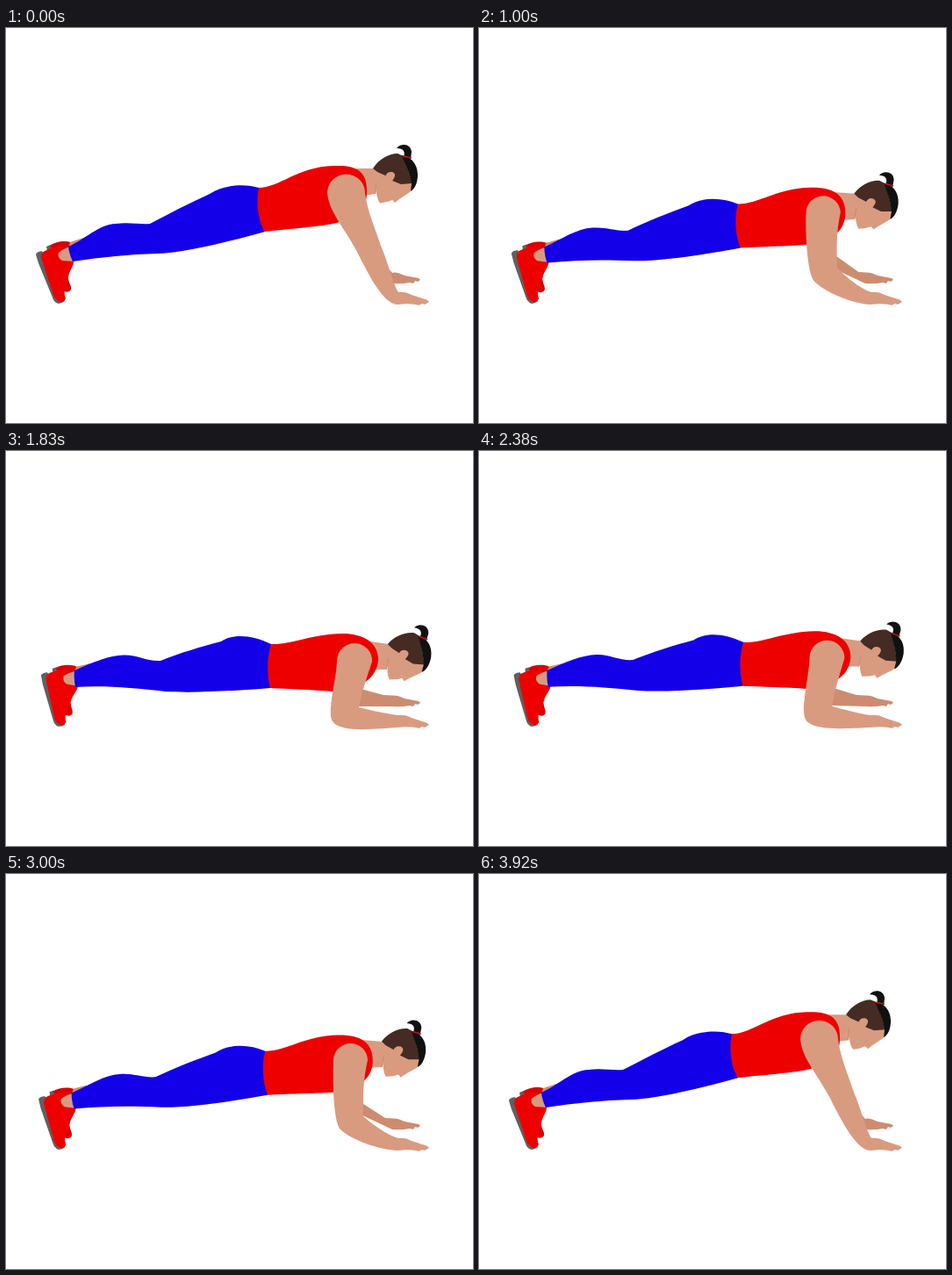
These frames come from a looping animation (532 px wide and 450 px high, 3960 ms). An HTML page:

```html
<!DOCTYPE html>
<html lang="en">
<head>
<meta charset="utf-8">
<title>Push-up</title>
<style>
  html, body { margin: 0; width: 100%; height: 100%; overflow: hidden; background: #fff; }
  svg { display: block; width: 100%; height: 100%; }
  .skin { fill: #d99b7f; }
  .shade { fill: #cd8c70; }
  .red { fill: #ee0000; }
  .dark-red { fill: #d90000; }
  .blue { fill: #1400e8; }
  .sole { fill: #606060; }
  .hair { fill: #452b23; }
  .black { fill: #111; }
</style>
</head>
<body>
<svg viewBox="0 0 532 450">
  <path id="farArm" class="shade"/>

  <g id="feet">
    <path class="shade" d="M70 245L88 239L84 250L68 256Z"/>
    <path class="sole" d="M46 249L51 247L53 256L47 254Z"/>
    <path class="dark-red" d="M50 248C56 243 68 242 73 244L71 251L58 262Z"/>
    <path class="dark-red" d="M64 284L71 286C72 292 75 294 74 298Q72 302 66 300Z"/>
    <path class="sole" d="M34 258Q35 255 41 254L48 270L67 311Q62 315 58 313.500Q54 311 53 307L37 268Z"/>
    <path class="red" d="M41 256C48 251 56 250 64 248L77 266C77 272 72 276 71 284C70 294 64 298 68 308Q66 313 62 312Q56 310 54 304L40 262Z"/>
    <path class="skin" d="M60 256Q64 252 73 249L78 266L64 265Q58 261 60 256Z"/>
  </g>

  <g id="head">
    <path class="skin" d="M395 160L419 160L424 168L421 189L400 192Z"/>
    <path class="skin" d="M419 160L440 150L462 176Q463 184 460 187L448 195L443 199L440 196Q434 199 426 199.500Q422 195 421 180Z"/>
    <path d="M421.500 176L420.500 189" stroke="#c98a6e" fill="none"/>
    <path class="hair" d="M418 160C424 150 436 143 446 143L453 146L463 177L450 178L440 174L432 168L423 164Z"/>
    <path class="skin" d="M432 169Q434 163 440 164Q445 166 442 171L439 176Z"/>
    <path class="black" d="M451 145.500C464 147 469 158 469 167C469 177 465 184 461 186L462 177C460 165 455 155 451 145.500Z"/>
    <path class="black" d="M445 137C449 131 461 131 462 141L461 149L453 147C455 141 453 137 445 137Z"/>
    <path d="M452 146L462 148" stroke="#d01010" stroke-width="1.500"/>
  </g>

  <path id="torso" class="red"/>
  <path id="legs" class="blue"/>
  <path id="nearArm" class="skin"/>
</svg>
<script>
const LOOP = 3960, FRAMES = 95, FPMS = 0.024;

// Key depths: 0 is the raised pose, 1 the lowest one.
const bodyDepths = [0, 0.978];
const armDepths = [0, 0.199, 0.509, 0.731, 0.978];

// The waist side reaches under the legs so that no seam shows.
const torso = [
  'M287 182C312 182 332 158 373 157C400 156 412 163 411 188C411 205 400 215 380 221C365 226 330 228 295 232C280 222 276 200 287 182Z',
  'M302 220C325 221 345 209 383 208C408 208 425 219 424 239C422 256 410 270 372 274C350 272 320 271 301 270C289 255 289 235 302 220Z'
];

const legs = [
  'M71 249C90 241 105 224 125 223C140 221 152 224 164 223C185 212 210 199 232 189C250 177 275 178 288 182C284 200 288 222 295 232C255 243 205 256 172 257C140 258 110 261 76 266Q72 258 71 249Z',
  'M78 250C100 240 118 233 134 232.5C150 232 160 240 176 239C195 231 225 222 245 217C258 208 280 209 302 220C297 235 297 255 301 270C265 273 215 276 182 274C145 270 115 267 79 269Q77 260 78 250Z'
];

const nearHand = 'C455 314 460 314 467 315L470 316L474 314L477 315L482 312Q480 309 474 308L462 304Q455 300 447 301Z';
const nearArm = [
  'C441 292 435 266 427 248C421 229 412 210 409 188A9 9 0 0 0 366 188C368 212 390 232 404 263C413 280 430 315 446 315',
  'C441 300 424 272 416 251C413 238 409 215 410 198A9 9 0 0 0 369 198C369 218 379 253 393 271C402 284 431 314 446 315',
  'C436 298 418 286 407 276C407 258 406 238 412 212A9 9 0 0 0 373 213C372 237 373 280 380 290C392 303 425 314 446 315',
  'C436 299 414 291 403 286C404 268 409 246 414 224A9 9 0 0 0 375 224C374 248 366 290 374 301C382 313 425 314 446 315',
  'C436 300 414 295 402 292C405 275 411 258 417 240A9 9 0 0 0 377 238C377 258 365 298 372 308C381 322 425 316 446 315'
].map(d => 'M447 301' + d + nearHand);

const farHand = 'Q442 278 448 279.5L454 282L470 285L472 287L469 289L466 288L464 291L460 290Q450 292 440 291';
const farArm = [
  ['M425 262L440 279', 'L432 285Z'],
  ['M414 247L435 278', 'L425 285Z'],
  ['M404 260L432 278', 'L404 274Z'],
  ['M402 266L430 278', 'L400 285Z'],
  ['M404 271L430 278', 'L398 291Z']
].map(([top, bottom]) => top + farHand + bottom);

const NUMBER = /[\d.]+/g;
const byId = id => document.getElementById(id);

// Arc flags must stay bare digits, so trailing zeros are dropped.
function blend(from, to, mix) {
  const ends = to.match(NUMBER);
  let i = 0;
  return from.replace(NUMBER, n => +(+n + (ends[i++] - n) * mix).toFixed(2));
}

function morph(id, poses, depths, depth) {
  let i = 0;
  while (i < depths.length - 2 && depth > depths[i + 1]) i++;
  const mix = (depth - depths[i]) / (depths[i + 1] - depths[i]);
  byId(id).setAttribute('d', blend(poses[i], poses[i + 1], mix));
}

function turn(id, angle, x, y) {
  byId(id).setAttribute('transform', `rotate(${angle} ${x} ${y})`);
}

function draw(time) {
  const frame = Math.floor((time % LOOP) * FPMS + 0.1);
  const depth = (1 - Math.cos((frame - 1) / FRAMES * 2 * Math.PI)) / 2;
  morph('torso', torso, bodyDepths, depth);
  morph('legs', legs, bodyDepths, depth);
  morph('nearArm', nearArm, armDepths, depth);
  morph('farArm', farArm, armDepths, depth);
  turn('head', 8.9 * depth, 33, 301);
  turn('feet', 6.3 * depth, 61, 312);
}

const start = performance.now();
function tick() {
  draw(performance.now() - start);
  requestAnimationFrame(tick);
}
tick();
</script>
</body>
</html>
```
